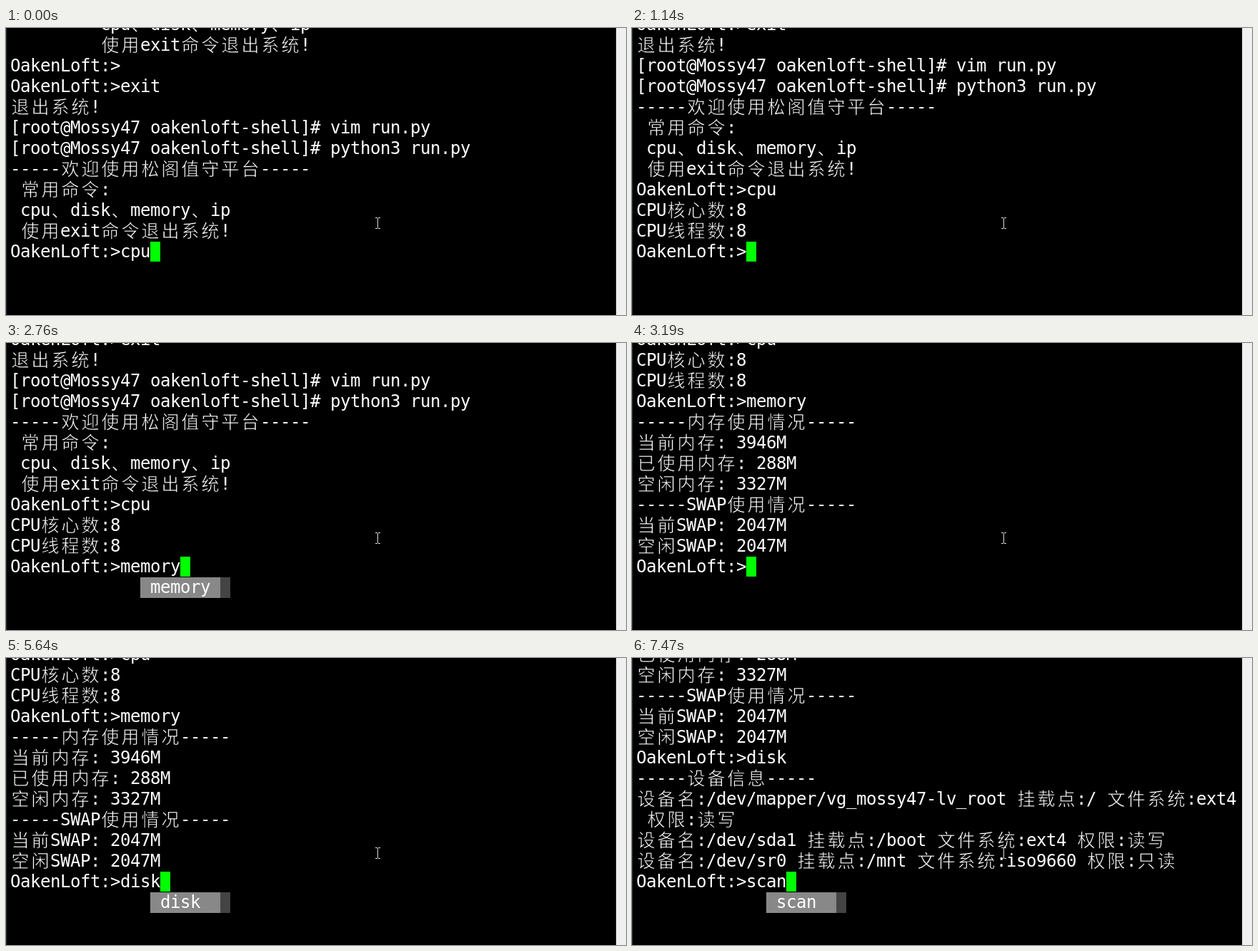
Write an HTML page with a canvas that moves like this. It is 868 px wide and 403 px high and loops after 8 s.

```html
<!DOCTYPE html>
<html lang="zh-CN">
<head>
<meta charset="utf-8">
<title>Terminal</title>
<style>
  html, body { margin: 0; width: 100%; height: 100%; overflow: hidden; background: #000; }
  canvas { display: block; }
</style>
</head>
<body>
<canvas id="stage" width="868" height="403"></canvas>
<script>
const ctx = document.getElementById('stage').getContext('2d');
const LOOP = 8000;
const CELL = 14, ROW = 29, LEFT = 6, PROMPT_TOP = 300;
const LATIN = '24px "DejaVu Sans Mono", monospace';
const HAN = '300 25px "Noto Sans CJK SC Light", "Noto Sans CJK SC", "Noto Sans CJK", sans-serif';
const PROMPT = 'OakenLoft:>';
const SHELL = '[root@Mossy47 oakenloft-shell]# ';

const log = [
  '         cpu、disk、memory、ip',
  '         使用exit命令退出系统!',
  PROMPT,
  PROMPT + 'exit',
  '退出系统!',
  SHELL + 'vim run.py',
  SHELL + 'python3 run.py',
  '-----欢迎使用松阁值守平台-----',
  ' 常用命令:',
  ' cpu、disk、memory、ip',
  ' 使用exit命令退出系统!',
  PROMPT + 'cpu',
  'CPU核心数:8',
  'CPU线程数:8',
  PROMPT + 'memory',
  '-----内存使用情况-----',
  '当前内存: 3946M',
  '已使用内存: 288M',
  '空闲内存: 3327M',
  '-----SWAP使用情况-----',
  '当前SWAP: 2047M',
  '空闲SWAP: 2047M',
  PROMPT + 'disk',
  '-----设备信息-----',
  '设备名:/dev/mapper/vg_mossy47-lv_root 挂载点:/ 文件系统:ext4',
  ' 权限:读写',
  '设备名:/dev/sda1 挂载点:/boot 文件系统:ext4 权限:读写',
  '设备名:/dev/sr0 挂载点:/mnt 文件系统:iso9660 权限:只读',
];

// Start time, log lines above the prompt, input, and for completions:
// the word and how many letters were typed by hand.
const steps = [
  [0, 11, 'cpu'],
  [150, 11, 'exit'],
  [550, 11, 'cpu'],
  [1140, 14, ''],
  [2230, 14, 'm', 'memory', 1],
  [2350, 14, 'me', 'memory', 2],
  [2760, 14, 'memory', 'memory', 2],
  [3190, 22, ''],
  [5090, 22, 'd', 'disk', 1],
  [5240, 22, 'di', 'disk', 2],
  [5360, 22, 'dis', 'disk', 3],
  [5640, 22, 'disk', 'disk', 3],
  [6070, 28, ''],
  [6940, 28, 's', 'scan', 1],
  [7220, 28, 'sc', 'scan', 2],
  [7470, 28, 'scan', 'scan', 2],
];

const colX = col => LEFT + col * CELL;

function box(color, x, y, w, h) {
  ctx.fillStyle = color;
  ctx.fillRect(x, y, w, h);
}

// Han characters take two cells; a black outline thins their strokes.
function writeHan(char, x, y) {
  ctx.font = HAN;
  ctx.fillText(char, x, y);
  ctx.strokeStyle = '#000';
  ctx.lineWidth = 0.6;
  ctx.strokeText(char, x, y);
}

function write(text, col, top, color) {
  ctx.fillStyle = color;
  for (const char of text) {
    if (char > '\u2fff') {
      writeHan(char, colX(col) + 1.5, top + 23);
      col += 2;
    } else {
      ctx.font = LATIN;
      ctx.fillText(char, colX(col), top + 22);
      col++;
    }
  }
}

function drawMenu(word, typed, selected) {
  const label = ` ${word} `.padEnd(7);
  const col = PROMPT.length + typed, top = PROMPT_TOP + ROW;
  const width = label.length * CELL;
  box(selected ? '#888' : '#bbb', colX(col), top, width, ROW);
  box('#444', colX(col) + width, top, CELL, ROW);
  write(label, col, top, selected ? '#fff' : '#000');
}

function drawPointer() {
  box('#ddd', 520, 267, 1, 14);
  for (const y of [266, 281]) {
    box('#ddd', 517, y, 3, 1);
    box('#ddd', 521, y, 3, 1);
  }
}

function draw(time) {
  const [, count, input, word, typed] = steps.findLast(step => step[0] <= time);
  box('#000', 0, 0, 868, 403);

  for (let i = Math.max(0, count - 11); i < count; i++) {
    write(log[i], 0, PROMPT_TOP - (count - i) * ROW, '#fff');
  }

  write(PROMPT + input, 0, PROMPT_TOP, '#fff');
  const cursor = PROMPT.length + input.length;
  const hint = word ? word.slice(input.length) : '';
  box('#0f0', colX(cursor), PROMPT_TOP, CELL, 28);
  write(hint.slice(0, 1), cursor, PROMPT_TOP, '#000');
  write(hint.slice(1), cursor + 1, PROMPT_TOP, '#666');
  if (word) drawMenu(word, typed, input === word);

  box('#26303a', 0, 0, 1, 403);
  box('#d0d0d0', 854, 0, 1, 403);
  box('#f0f0f0', 855, 0, 13, 403);
  drawPointer();
}

function tick() {
  draw(performance.now() % LOOP);
  requestAnimationFrame(tick);
}
tick();
</script>
</body>
</html>
```
